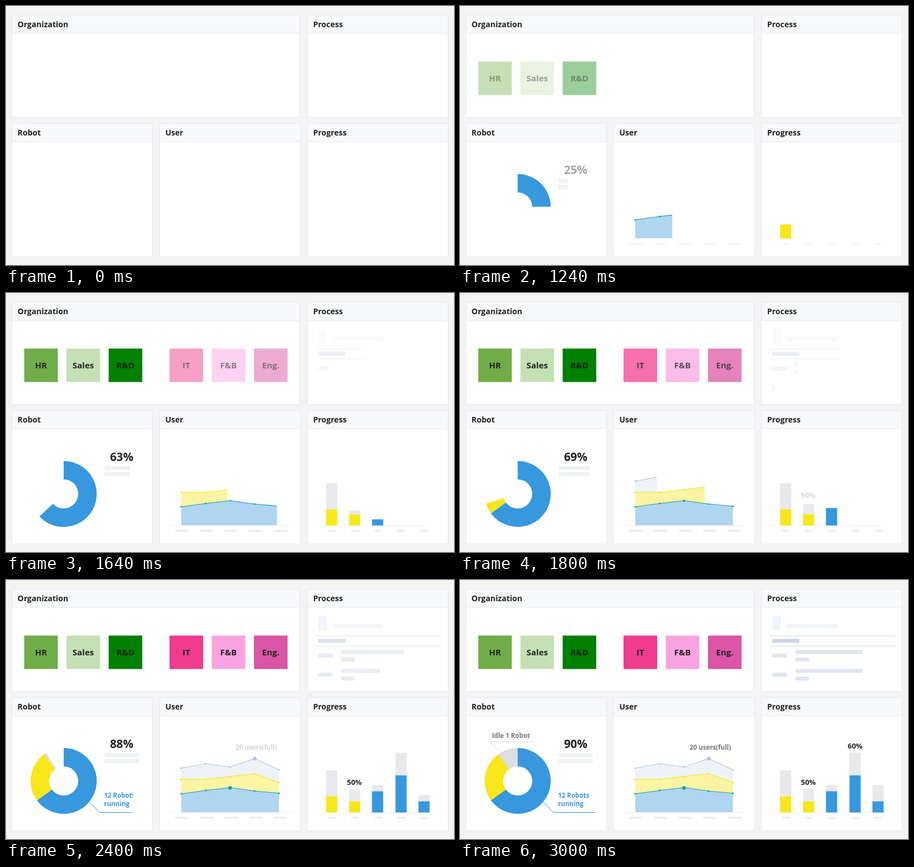
Write an HTML page with a canvas that moves like this. It is 800 by 464 pixels and loops after 4 s.

```html
<!DOCTYPE html>
<html lang="en">
<head>
<meta charset="utf-8">
<title>Dashboard</title>
<style>
  html, body { margin: 0; width: 100%; height: 100%; overflow: hidden; background: #f4f4f4; }
  canvas { display: block; width: 800px; height: 464px; }
</style>
</head>
<body>
<canvas id="stage" width="800" height="464"></canvas>
<script>
const ctx = document.getElementById('stage').getContext('2d');
const LOOP = 4000, STEP = 40, START = 1000, END = 3000;
const INK = '#222', BLUE = '#3798de', YELLOW = '#f8e71c', TEAL = '#0aa2ae', SLATE = '#b9c3dc';
let now = 0;

// Linear progress 0..1 of a move that begins at `from` and lasts `duration` ms.
const ramp = (from, duration) => Math.min(1, Math.max(0, (now - from) / duration));

function rect(x, y, w, h, color) {
  ctx.fillStyle = color;
  ctx.fillRect(x, y, w, h);
}

function text(str, x, y, size, color = INK, align = 'left') {
  ctx.font = `bold ${size}px "Open Sans", sans-serif`;
  ctx.textAlign = align;
  ctx.fillStyle = color;
  ctx.fillText(str, x, y);
}

function path(points, color, width) {
  ctx.beginPath();
  points.forEach(([x, y]) => ctx.lineTo(x, y));
  ctx.strokeStyle = color;
  ctx.lineWidth = width;
  ctx.stroke();
}

function dot(x, y, r, color) {
  ctx.beginPath();
  ctx.arc(x, y, r, 0, 2 * Math.PI);
  ctx.fillStyle = color;
  ctx.fill();
}

function fade(alpha, draw) {
  if (alpha <= 0) return;
  ctx.save();
  ctx.globalAlpha = alpha;
  draw();
  ctx.restore();
}

// Reveals a drawing from left to right between x0 and x1.
function wipe(x0, x1, progress, draw) {
  if (progress <= 0) return;
  ctx.save();
  ctx.beginPath();
  ctx.rect(x0, 0, (x1 - x0) * progress, 464);
  ctx.clip();
  draw();
  ctx.restore();
}

function panel(title, x, y, w, h) {
  rect(x, y, w, h, '#fff');
  rect(x, y, w, 33, '#f7f9fd');
  ctx.strokeStyle = '#e8e9f0';
  ctx.lineWidth = 1;
  ctx.strokeRect(x, y, w, h);
  path([[x, y + 32.5], [x + w, y + 32.5]], '#e8e9f0', 1);
  text(title, x + 10, y + 21.5, 14);
}

function panels() {
  panel('Organization', 10.5, 16.5, 514, 183);
  panel('Process', 538.5, 16.5, 251, 183);
  panel('Robot', 10.5, 210.5, 251, 239);
  panel('User', 274.5, 210.5, 251, 239);
  panel('Progress', 538.5, 210.5, 251, 239);
}

function organization() {
  const groups = [
    [980, 32.5, [['HR', '#70ad47'], ['Sales', '#c5e0b4'], ['R&D', '#008000']]],
    [1313, 292, [['IT', '#f13b8e'], ['F&B', '#f9a4e1'], ['Eng.', '#da55a4']]]
  ];
  for (const [from, left, tiles] of groups) {
    fade(ramp(from, 667), () => tiles.forEach(([name, color], i) => {
      const x = left + i * 75.4;
      rect(x, 99.5, 60, 60, color);
      text(name, x + 30, 135, 15, INK, 'center');
    }));
  }
}

function processRow(y, labelFrom, barsFrom) {
  const color = '#e0e5f0';
  wipe(558, 584, ramp(labelFrom, 145), () => rect(558, y + 6.5, 26, 7, color));
  wipe(599, 719, ramp(barsFrom, 667), () => {
    rect(599, y, 120, 7, color);
    rect(599, y + 13.5, 24, 7, color);
  });
}

function processList() {
  fade(ramp(980, 2000), () => {
    wipe(558, 673, ramp(1023, 490), () => {
      rect(558, 65, 15, 25, '#f0f3f8');
      rect(584, 79, 89, 7, '#f0f3f8');
    });
    wipe(553, 777, ramp(1252, 963), () => {
      rect(553, 99.5, 224, 1, '#d0d5e2');
      rect(553, 117.5, 224, 1, '#d0d5e2');
      rect(558, 105.5, 48, 7, '#cfd5e5');
    });
    processRow(125.5, 1540, 1780);
    processRow(159.5, 1780, 2020);
  });
}

function sector(from, to, color) {
  if (to <= from) return;
  const a = (from - 0.25) * 2 * Math.PI, b = (to - 0.25) * 2 * Math.PI;
  ctx.beginPath();
  ctx.arc(103, 360, 59, a, b);
  ctx.arc(103, 360, 26, b, a, true);
  ctx.fillStyle = color;
  ctx.fill();
}

function robot() {
  sector(0, 0.65 * ramp(980, 680), BLUE);
  sector(0.65, 0.65 + 0.25 * ramp(1660, 660), YELLOW);
  sector(0.9, 0.9 + 0.1 * ramp(2320, 660), '#dcdee6');

  const count = Math.round(65 * ramp(980, 680) + 25 * ramp(1660, 800));
  fade(ramp(980, 667), () => text(count + '%', 227.5, 301, 20.5, INK, 'right'));
  wipe(175.5, 237.5, ramp(1000, 880), () => {
    rect(175.5, 309.5, 62, 7.5, '#eff2f7');
    rect(175.5, 320.5, 62, 7.5, '#eff2f7');
  });

  wipe(148, 241, ramp(2080, 376), () => {
    path([[148, 397], [167.5, 416.5], [241, 416.5]], BLUE, 1);
    text('12 Robots', 175, 390, 11.5, BLUE);
    text('running', 175, 405, 11.5, BLUE);
  });
  wipe(53, 132, ramp(2520, 440), () => {
    path([[73, 309], [53.5, 289.5], [132, 289.5]], '#dcdee8', 1);
    text('Idle 1 Robot', 57, 283, 11.5, '#777');
  });
}

function axis(x0, x1, tickX, tickGap, tickWidth) {
  fade(ramp(980, 560), () => {
    rect(x0, 416, x1 - x0, 1, '#eeeff3');
    for (let i = 0; i < 5; i++) rect(tickX + i * tickGap, 424, tickWidth, 4, '#eef0f5');
  });
}

function area(heights, from, fill, stroke) {
  const points = heights.map((y, i) => [313 + i * 43.6, y]);
  wipe(311, 489, ramp(from, 680), () => {
    ctx.beginPath();
    [[313, 416], ...points, [487.4, 416]].forEach(([x, y]) => ctx.lineTo(x, y));
    ctx.fillStyle = fill;
    ctx.fill();
    path(points, stroke, 1.2);
    points.forEach(([x, y]) => dot(x, y, 1.6, stroke));
  });
}

function user() {
  axis(291, 511, 302, 44, 24);
  area([337, 329, 335, 320, 340], 1645, '#eff2f8', SLATE);
  area([357, 357, 352, 347, 363], 1318, '#fbf4a3', YELLOW);
  area([383, 377, 372, 378, 382], 980, '#afd5f0', TEAL);
  dot(400, 372.5, 3.3 * ramp(1660, 240), TEAL);
  dot(444, 320, 3.3 * ramp(2160, 240), SLATE);
  fade(ramp(2200, 630), () => text('20 users(full)', 410, 304, 11.5, '#777'));
}

function progress() {
  axis(555, 757, 575, 41.3, 14);
  // x, filled height, rest height, fill start, rest start, colour
  const bars = [
    [571.5, 29, 46.5, 980, 1285, YELLOW],
    [612.5, 20, 22.5, 1254, 1554, YELLOW],
    [653.5, 38, 11, 1553, 2000, BLUE],
    [695.5, 66.5, 41, 1805, 2105, BLUE],
    [736.5, 20, 29, 1985, 2285, BLUE]
  ];
  for (const [x, filled, rest, from, restFrom, color] of bars) {
    const h = filled * ramp(from, 300), extra = rest * ramp(restFrom, 300);
    rect(x, 416.5 - h - extra, 20, extra, '#e8e9ed');
    rect(x, 416.5 - h, 20, h, color);
  }
  fade(ramp(1680, 667), () => text('50%', 622, 366.5, 13, INK, 'center'));
  fade(ramp(2420, 560), () => text('60%', 705.5, 302, 13, INK, 'center'));
}

function draw(time) {
  now = Math.min(END, Math.floor((time % LOOP) / STEP) * STEP);
  rect(0, 0, 800, 464, '#f4f4f4');
  panels();
  if (now >= START) {
    organization();
    processList();
    robot();
    user();
    progress();
  }
}

const begin = performance.now();
function tick() {
  draw(performance.now() - begin);
  requestAnimationFrame(tick);
}
tick();
</script>
</body>
</html>
```
